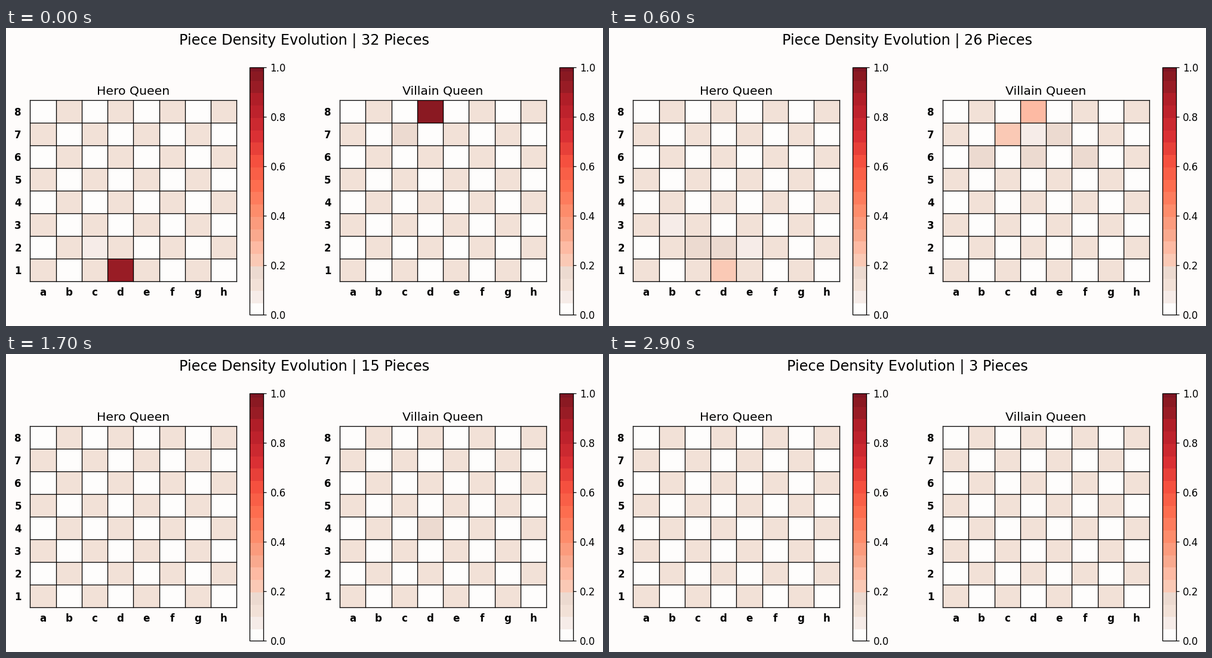
These frames come from a looping animation (1000x500 px, 3 s). A matplotlib script:

```python
import numpy as np
import matplotlib.pyplot as plt
from matplotlib.animation import FuncAnimation
from matplotlib.cm import ScalarMappable
from matplotlib.colors import BoundaryNorm, LinearSegmentedColormap, ListedColormap

WIDTH, HEIGHT, DPI = 1000, 500, 100
FRAMES, INTERVAL = 30, 100
BACKGROUND = "#fefcfb"
LIGHT, DARK = 0.02, 0.12

plt.rcParams.update({"font.family": "DejaVu Sans", "font.size": 12})

RAMP = [
    (0.00, "#fefdfc"), (0.025, "#fefdfc"), (0.07, "#f6ece8"), (0.12, "#f2e1d7"),
    (0.17, "#ecdad0"), (0.22, "#fac9b5"), (0.27, "#fdbaa3"), (0.32, "#f9a98e"),
    (0.42, "#fd8c6b"), (0.52, "#fd6d4f"), (0.62, "#f5503f"), (0.72, "#da3034"),
    (0.82, "#bd222c"), (0.87, "#b01e28"), (0.92, "#981c25"), (0.97, "#881922"),
    (1.00, "#7a1424"),
]
EDGES = np.concatenate([[0], np.arange(0.045, 0.96, 0.05), [0.982, 1]])
smooth = LinearSegmentedColormap.from_list("density", RAMP, N=1024)
CMAP = ListedColormap(smooth((EDGES[:-1] + EDGES[1:]) / 2))
NORM = BoundaryNorm(EDGES, CMAP.N)

# Queen density per square at key moments; other squares rest at the board tone.
HERO = {
    0: {"d1": 0.93, "c2": 0.06},
    4: {"d1": 0.27, "c2": 0.17, "d2": 0.17, "b3": 0.06, "e2": 0.06},
    9: {"d1": 0.12, "c2": 0.12, "d2": 0.17, "e2": 0.07, "b3": 0.07,
        "c3": 0.16, "d3": 0.07, "g3": 0.17},
    12: {"c2": 0.06, "d2": 0.17},
    17: {},
    29: {},
}
VILLAIN = {
    0: {"d8": 0.97, "c7": 0.17},
    4: {"d8": 0.31, "c7": 0.23, "d7": 0.06, "e7": 0.17, "b6": 0.17,
        "d6": 0.17, "f6": 0.17},
    9: {"d8": 0.16, "c7": 0.22, "d7": 0.06, "e7": 0.17, "b6": 0.17,
        "d6": 0.17, "f6": 0.17, "e5": 0.17, "h4": 0.17},
    12: {"d8": 0.17, "c7": 0.17, "d7": 0.06, "e7": 0.17, "b6": 0.17, "d6": 0.17},
    17: {"d4": 0.17},
    25: {"g1": 0.17},
    29: {},
}


def board(densities):
    rank, file = np.indices((8, 8))
    grid = np.where((rank + file) % 2 == 0, DARK, LIGHT)
    for square, value in densities.items():
        grid[int(square[1]) - 1, "abcdefgh".index(square[0])] = value
    return grid


def tween(keys, i):
    times = list(keys)
    k = min(np.searchsorted(times, i, side="right") - 1, len(times) - 2)
    start, end = times[k], times[k + 1]
    t = (i - start) / (end - start)
    return (1 - t) * board(keys[start]) + t * board(keys[end])


fig = plt.figure(figsize=(WIDTH / DPI, HEIGHT / DPI), dpi=DPI, facecolor=BACKGROUND)


def pixel_axes(x0, y0, x1, y1):
    return fig.add_axes([x0 / WIDTH, 1 - y1 / HEIGHT,
                         (x1 - x0) / WIDTH, (y1 - y0) / HEIGHT])


def make_panel(left, title, keys):
    ax = pixel_axes(left, 120.8, left + 346, 424.8)
    mesh = ax.pcolormesh(board(keys[0]), cmap=CMAP, norm=NORM)
    for k in range(9):
        line = dict(color="black", linewidth=0.95, clip_on=False,
                    solid_capstyle="projecting")
        ax.plot([k, k], [0, 8], **line)
        ax.plot([0, 8], [k, k], **line)
    ax.set(xlim=(0, 8), ylim=(0, 8))
    ax.set_title(title, fontsize=14.7, pad=6.5)
    ax.set_xticks(np.arange(8) + 0.5, list("abcdefgh"), weight="bold")
    ax.set_yticks(np.arange(8) + 0.5, list("12345678"), weight="bold")
    ax.tick_params(axis="x", length=0, pad=7)
    ax.tick_params(axis="y", length=0, pad=10.4)
    ax.spines[:].set_visible(False)

    cax = pixel_axes(left + 368, 65.8, left + 391, 480.8)
    bar = fig.colorbar(ScalarMappable(NORM, CMAP), cax=cax,
                       ticks=np.linspace(0, 1, 6), spacing="proportional",
                       format="%.1f")
    bar.minorticks_off()
    bar.outline.set_linewidth(0.95)
    cax.tick_params(length=3.7, width=0.9, pad=4.4)
    return mesh, keys


panels = [make_panel(40.3, "Hero Queen", HERO),
          make_panel(559, "Villain Queen", VILLAIN)]
heading = fig.text(0.5, 1 - 28 / HEIGHT, "", fontsize=17.25, ha="center", va="baseline")


def update(i):
    heading.set_text(f"Piece Density Evolution | {32 - i} Pieces")
    for mesh, keys in panels:
        mesh.set_array(tween(keys, i))
    return [heading] + [mesh for mesh, _ in panels]


anim = FuncAnimation(fig, update, frames=FRAMES, interval=INTERVAL,
                     repeat=True, repeat_delay=0)
plt.show()
```
